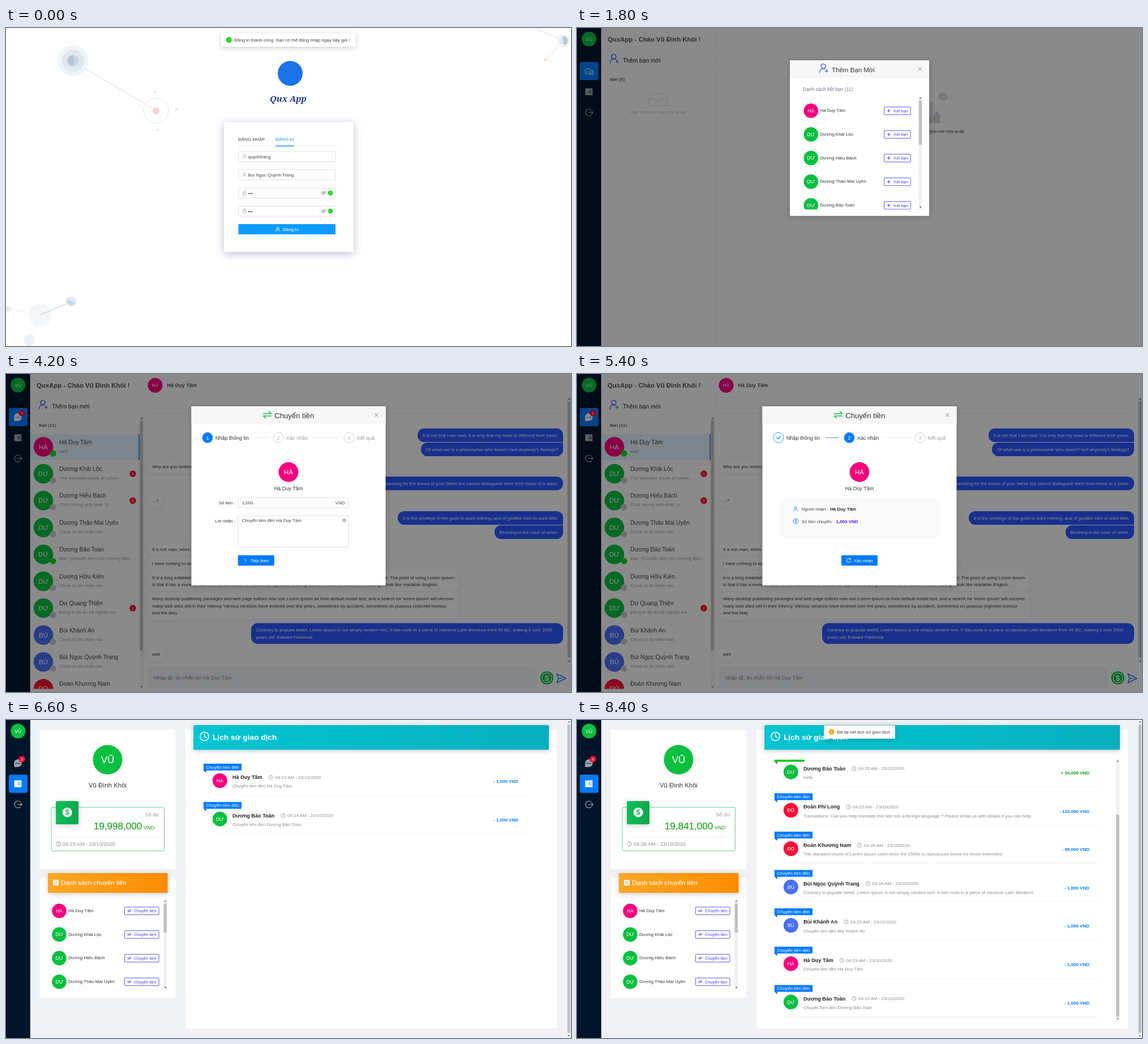
An HTML page for the animation above (9 s loop, 998 by 561 pixels).

```html
<!DOCTYPE html>
<html lang="vi">
<head>
<meta charset="utf-8">
<title>Chat app tour</title>
<style>
html,body{margin:0;width:100%;height:100%;overflow:hidden;background:#fff}
svg{display:block;width:100vw;height:100vh;font-family:"Liberation Sans",Arial,sans-serif}
text{white-space:pre}
.scene{display:none}
.scene.on{display:inline}
.soft{filter:drop-shadow(0 2px 3px rgba(60,70,110,.08))}
.drop{filter:drop-shadow(0 2px 5px rgba(0,0,0,.2))}
.glow{filter:drop-shadow(0 3px 8px rgba(90,60,170,.38))}
.word{font-family:"Noto Serif","Liberation Serif",serif;font-style:italic;font-weight:700}
</style>
</head>
<body>
<svg id="stage" viewBox="0 0 998 561" preserveAspectRatio="none"></svg>
<script>
const BLUE = '#007bff', GREEN = '#0bbf3f', LIME = '#05dc0c', RED = '#fa0f35', PINK = '#f5007f', VIOLET = '#4a6ff5', MONEY = '#0a9a0a';
const BOLD = 'font-weight="700"', MID = 'text-anchor="middle"', END = 'text-anchor="end"';

// Shape helpers
const text = (x, y, s, fill, t, a = '') => `<text x="${x}" y="${y}" font-size="${s}" fill="${fill}" ${a}>${t}</text>`;
const rect = (x, y, w, h, fill, rx = 0, a = '') => `<rect x="${x}" y="${y}" width="${w}" height="${h}" rx="${rx}" fill="${fill}" ${a}/>`;
const circ = (x, y, r, fill, a = '') => `<circle cx="${x}" cy="${y}" r="${r}" fill="${fill}" ${a}/>`;
const line = (x1, y1, x2, y2, c = '#ececf0', w = .7, a = '') => `<path d="M${x1} ${y1}L${x2} ${y2}" stroke="${c}" stroke-width="${w}" ${a}/>`;
const stroke = (d, c, w = 1, x = 0, y = 0, k = 1) =>
  `<path d="${d}" transform="translate(${x} ${y}) scale(${k})" fill="none" stroke="${c}" stroke-width="${w}" stroke-linecap="round" stroke-linejoin="round"/>`;
const clip = (id, body) => `<g clip-path="url(#${id})">${body}</g>`;
const ctx = document.createElement('canvas').getContext('2d');
const widthOf = (t, s, weight = 400) => {
  ctx.font = `${weight} ${s}px "Liberation Sans",Arial,sans-serif`;
  return ctx.measureText(t).width;
};

// Icons
const userIcon = (x, y, k, c, w = 1) => stroke('M-2.6-2.4a2.6 2.6 0 1 0 5.2 0a2.6 2.6 0 1 0-5.2 0M-4.4 5C-4-1 4-1 4.4 5', c, w, x, y, k);
const addIcon = (x, y) => userIcon(x - 1, y, 1.5, VIOLET, 1.1) + rect(x + 2, y + 2, 7, 7, '#fbfbfd') + stroke('M5 2.5v5M2.5 5h5', VIOLET, 1.3, x, y);
const check = (x, y, k, c = '#fff', w = 1.4) => stroke('M-3 0l2.2 2.2L3-2.4', c, w, x, y, k);
const cross = (x, y) => stroke('M-3-3L3 3M3-3L-3 3', '#777', .9, x, y);
const clock = (x, y, r, c, w = .8) => circ(x, y, r, 'none', `stroke="${c}" stroke-width="${w}"`) + stroke(`M0 ${-r * .6}V0l${r * .5} ${r * .3}`, c, w, x, y);
const swap = (x, y, k, c, w = 1) => stroke('M-7-2H7L3-6M7 2H-7l4 4', c, w, x, y, k);
const wallet = (x, y, c, hole) => rect(x - 6.5, y - 6, 13, 12, c, 1) + rect(x, y - 2, 6.5, 4, hole) + rect(x + 1, y - 1.2, 5.5, 2.4, c);
const bubbles = (x, y) => stroke('M-6 3a5 5 0 1 1 8 1l-3 0l-4 1zM3 5c3-1 4-5 2-7c3 1 3 5 1.500 6l1 2l-3-.5c-2 .6-3 0-4-.8', '#fff', 1, x, y) + [-4, -1.5, 1].map(d => circ(x + d, y, .6, '#fff')).join('');
const talk = (x, y, c, dot) => circ(x, y, 6.8, c) + `<path d="M${x - 6.5} ${y}v7h6z" fill="${c}"/>` + [-3, 0, 3].map(d => circ(x + d, y + .5, .9, dot)).join('');
const badge = (x, y, n, r = 5.8) => circ(x, y, r, RED) + text(x, y + 2.5, 7, '#fff', n, MID);
const coin = (x, y, r, c, sign) => circ(x, y, r, c) + text(x, y + r * .52, r * 1.5, sign, '$', MID + BOLD.padStart(20));
const coinLine = (x, y, c) => circ(x, y, 4.5, 'none', `stroke="${c}" stroke-width=".9"`) + text(x, y + 2.5, 7, c, '$', MID);
const scrollbar = (x, y0, y1, t0, t1, w = 6.5) => rect(x, y0, w, y1 - y0, '#f1f1f3') + rect(x + .6, t0, w - 1.2, t1 - t0, '#c1c1c3') +
  `<path d="M${x + 1.5} ${y0 + 4.5}h4l-2-2.500zM${x + 1.5} ${y1 - 5}h4l-2 2.500z" fill="#666"/>`;

// People
const me = ['Vũ Đình Khôi', GREEN];
const people = [
  ['Hà Duy Tâm', PINK], ['Dương Khải Lộc', GREEN], ['Dương Hiếu Bách', GREEN], ['Dương Thảo Mai Uyên', GREEN],
  ['Dương Bảo Toàn', GREEN], ['Dương Hữu Kiên', GREEN], ['Dư Quang Thiện', GREEN], ['Bùi Khánh An', VIOLET],
  ['Bùi Ngọc Quỳnh Trang', VIOLET], ['Đoàn Khương Nam', RED], ['Đoàn Phi Long', RED]
];
const [peer] = people;
const avatar = (x, y, r, [name, c]) => {
  const s = r > 20 ? 17.1 : r > 15 ? 11.4 : 8.6;
  return circ(x, y, r, c) + text(x, y + s * .36, s, '#fff', name.slice(0, 2).toUpperCase(), MID);
};

// Sign-in page
const deco = () =>
  line(125, 63, 258, 141, '#d3dae5', 1) + circ(118.5, 57.5, 27, '#eff4f8') + circ(118.5, 57.5, 19.5, '#dfe8ef') + circ(118.5, 57.5, 10, '#cbd6e1') +
  '<path d="M118.500 47.500a10 10 0 0 0 0 20l1-10z" fill="#b4c6d6"/>' + circ(265, 146, 22, 'none', 'stroke="#e2e8ed"') + circ(265, 146, 6, '#fbcdd7') +
  circ(263, 113, 2, '#fbd6dd') + circ(301, 143, 1.6, '#e2c0ce') + circ(268, 180, 1.2, '#ddd3dc') +
  line(945, 5, 975, 18, '#d8dde7', 1) + line(977, 31, 954, 54, '#d8dde7', 1) + circ(942, 3, 3.3, '#fff', 'stroke="#d8dde7"') +
  circ(984.5, 22.5, 10.5, '#fff', 'stroke="#d8dde7"') + circ(984.5, 22.5, 8, '#e2eaf1') + '<path d="M983 14.500a8 8 0 0 1 3 16z" fill="#b9cad9"/>' + circ(952.5, 56, 2.5, '#fbe2ac') +
  circ(60, 506.5, 20, '#f4f7f9') + line(60, 506.5, 108, 486, '#cfdbe6', 1.7) + circ(115, 482, 8.7, '#e4eaf0') + '<path d="M107 479l16 6a8.700 8.700 0 0 1-16-6z" fill="#c8d5e0"/>' +
  line(10, 497, 41, 503, '#e4dfe4', .8, 'stroke-dasharray="2 2"') + line(60, 507, 45, 543, '#d9dfe5', .8, 'stroke-dasharray="2 2"') + circ(5, 496, 5, '#e8ecf1') + circ(41.5, 551, 10, '#edf1f5');

const toast = (x, w, c, mark, t) => rect(x, 9.5, w, 23.5, '#fff', 2, 'class="drop"') + circ(x + 13.7, 21, 4.9, c) + mark(x + 13.7, 21) + text(x + 23, 24, 8, '#444', t);
const okMark = (x, y) => check(x, y, .6);
const warnMark = (x, y) => text(x, y + 2.5, 7, '#fff', '!', MID);

function field(y, value, secret, ok) {
  let s = rect(410.5, y, 171.5, 18, '#fff', 1, 'stroke="#d9d9dd" stroke-width=".8"');
  s += secret ? rect(418.5, y + 8, 5.5, 5, 'none', .5, 'stroke="#aaa" stroke-width=".8"') + stroke('M-1.700 0v-1.500a1.700 1.700 0 0 1 3.400 0V0', '#aaa', .8, 421.2, y + 8) : userIcon(421.2, y + 9, .72, '#aaa');
  s += text(427.5, y + 12, 8, '#444', value);
  if (secret) s += stroke('M-4 0Q0-5 4 0Q0 5-4 0M-3 3L3-3M-1 0a1 1 0 0 1 2 0', '#777', .8, 561, y + 9);
  if (ok) s += circ(573, y + 9, 4.3, LIME) + check(573, y + 9, .55);
  return s;
}

function signIn(register) {
  const bottom = register ? 395 : 331, by = bottom - 49;
  const tab = (x, w, t, on) => text(x, 198.5, 8, on ? '#1a86f0' : '#444', t) + (on ? rect(x, 207.5, w, 1.4, '#1a86f0') : '');
  return rect(0, 0, 998, 561, '#fff') + deco() + circ(502, 80, 22, '#1a73e8') + text(498.5, 130, 15, '#17357f', 'Qux App', MID + ' class="word"') +
    rect(385, 166, 228.5, bottom - 166, '#fff', 1, 'class="glow"') + line(410, 208.5, 588, 208.5, '#ebebef') +
    tab(410, 48, 'ĐĂNG NHẬP', !register) + tab(476, 33, 'ĐĂNG KÍ', register) + field(218, 'quynhtrang') +
    (register ? field(250, people[8][0]) + field(282, '•••', 1, 1) + field(314, '•••', 1, 1) : field(250, '•••', 1)) +
    rect(410.5, by, 171.5, 18, '#0d9bff', 1) + userIcon(480, by + 9, .75, '#fff', 1.2) + text(489, by + 12, 8, '#fff', register ? 'Đăng kí' : 'Đăng nhập') +
    (register ? toast(380, 237.5, LIME, okMark, 'Đăng kí thành công. Bạn có thể đăng nhập ngay bây giờ !') : '');
}

// App frame and friend list
function rail(active, n, dot) {
  const chat = active === 0;
  return rect(0, 0, 42.8, 561, '#001529') + avatar(21.3, 19.5, 13, me) + rect(5, chat ? 60 : 96.5, 33, 32, BLUE, 3) +
    (n ? talk(21, 76, chat ? '#fff' : '#9aa3ad', chat ? BLUE : '#001529') + badge(28, 69, n) : bubbles(21, 76)) +
    wallet(21, 112.5, chat ? '#a5adb5' : '#fff', chat ? '#001529' : BLUE) + (dot ? circ(28, 106, 3.5, RED) : '') +
    stroke('M4-4.500a6 6 0 1 0 0 9M-1 0h8M5-2l2 2l-2 2', '#a5adb5', 1.2, 21, 149);
}

function friends(rows) {
  let s = rect(42.8, 0, 201, 561, '#fbfbfd') + text(54, 24, 11.4, '#4a5058', `QuxApp - Chào ${me[0]} !`, BOLD) + line(43, 41, 243, 41) + addIcon(66, 54) +
    text(81, 61, 10.27, '#222', 'Thêm bạn mới') + line(43, 70.5, 243, 70.5) + line(43, 90, 54, 90) + line(92, 90, 236, 90) +
    text(58, 93, 8, '#222', `Bạn (${rows ? 11 : 0})`);
  if (!rows) return s + stroke('M-16 0l6-9H10l6 9v10q0 2-2 2h-28q-2 0-2-2zh9q1 5 4 5h6q3 0 4-5h9', '#d5d5d9', 1, 143, 125) + text(143, 151, 8, '#bcbcc0', 'Bạn chưa kết bạn với ai cả', MID) + line(243.5, 0, 243.5, 561, '#e4e4e8');
  const list = people.slice(0, 10).map((p, i) => {
    const y = 128.5 + 47.43 * i, { sub = 'Chưa có tin nhắn nào', n, on } = rows[i] || {};
    return (i || rows.idle ? '' : rect(43, 106, 193, 46, '#e2efff') + rect(234.3, 106, 1.7, 46, '#1a7cf0')) + avatar(66, y, 17.3, p) +
      circ(83, y + 11.7, 5.5, on ? LIME : '#c8c8cc') + text(94.3, y - 5, 10.27, '#444', p[0]) + text(94.3, y + 10, 8, '#999', sub) + (n ? badge(224, y + 47.4 - 47.4, n) : '');
  }).join('');
  return s + clip('friendClip', list) + scrollbar(236, 75, 556, 82, 488) + line(243.5, 0, 243.5, 561, '#e4e4e8');
}

// Conversation
const MINE = [
  ['It is not that I am mad, it is only that my head is different from yours.', 257, 108, 'b'],
  ["Of what use is a philosopher who doesn't hurt anybody's feelings?", 251, 133, 't'],
  ['I am searching for the bones of your father but cannot distinguish them from those of a slave.', 346, 193],
  ['It is the privilege of the gods to want nothing, and of godlike men to want little.', 292, 254, 'b'],
  ['Blushing is the color of virtue.', 121, 279, 't']
];
const THEIRS = [
  [['Why are you looking attentively at a pile of .'], 170, 163],
  [['.. ?'], 27, 223],
  [['If a rich man, when you will; if a poor man, when you can.'], 219, 309],
  [['I have nothing to ask but that you would remove to the other side, that you may not, by intercepting the sunshine ...'], 422, 334],
  [['It is a long established fact that a reader will be distracted by the readable content of a page when looking at its layout. The point of using Lorem Ipsum',
    "is that it has a more-or-less normal distribution of letters, as opposed to using 'Content here, content here', making it look like readable English."], 0, 359],
  [['Many desktop publishing packages and web page editors now use Lorem Ipsum as their default model text, and a search for \'lorem ipsum\' will uncover',
    'many web sites still in their infancy. Various versions have evolved over the years, sometimes by accident, sometimes on purpose (injected humour',
    'and the like).'], 0, 396.5]
];
const LONG = ['Contrary to popular belief, Lorem Ipsum is not simply random text. It has roots in a piece of classical Latin literature from 45 BC, making it over 2000',
  'years old. Edward Fairbrook'];
const INK = '#2a58ff';
const para = (x, y, c, lines) => lines.map((t, i) => text(x, y + 2.8 + 12.4 * i, 8, c, t)).join('');

function chat({ right = 992, scroll = 0, well, card }) {
  const wide = right === 992 ? 557 : 551;
  let s = line(248, 68.5, right, 68.5, '#e6e6ea') + rect(right / 2 + 85.5, 62, 78.5, 13.5, '#c3c5c9', 4) + text(right / 2 + 124.7, 71, 6.85, '#fff', '23-10-2020 04:03 AM', MID + ' ' + BOLD);
  for (const [t, w, y, sq] of MINE)
    s += rect(right - w, y - 12, w, 24, INK, 11.5) + (sq ? rect(right - 13, sq === 't' ? y - 12 : y, 13, 12, INK, 1.5) : '') + text(right - 8.3, y + 2.8, 8, '#fff', t, END);
  const rest = well ? [...THEIRS, [['well'], 30, 494.5]] : THEIRS;
  for (const [t, w, y] of rest) s += rect(250, y - 12, w || wide - 1, 24 + 12.4 * (t.length - 1), '#fdfdfe', 11, 'class="soft"') + para(258, y, '#333', t);
  s += rect(right - wide, 439.5, wide, 36.5, INK, 11.5) + para(right - wide + 8.7, 451.5, '#fff', LONG);
  if (card) s += rect(851, 507.5, 133, 49.5, '#05c457', 6, 'class="drop"') + coin(871, 525, 9, '#fff', '#05c457') +
    text(892, 526.5, 9.13, '#fff', 'Chuyển 1,000 VND', BOLD) + text(889, 542, 8, '#fff', 'Chuyển tiền');
  return rect(243.8, 0, 755, 561, '#fafafd') + clip('chatClip', `<g transform="translate(0 ${-scroll})">${s}</g>`) +
    avatar(263.5, 20, 13, peer) + text(284.5, 22.5, 9.13, '#4a5058', peer[0], BOLD) + line(244, 41, 998, 41) +
    (right < 992 ? scrollbar(991.3, 41, 511, scroll ? 97 : 49, scroll ? 503 : 500) : '') +
    rect(250, 517, 688, 38, '#f0f1f3', 4) + text(261, 538.7, 9.13, '#7b8088', `Nhập @, tin nhắn tới ${peer[0]}`) +
    circ(955.3, 536, 11.6, GREEN) + circ(955.3, 536, 8.6, 'none', 'stroke="#fff" stroke-width="1.200"') + text(955.3, 541, 13.5, '#fff', '$', MID + ' ' + BOLD) +
    stroke('M0 0L16 8L0 16L3 8zM3 8H9', '#1a86f0', 1.5, 973, 529);
}

const noChat = rect(243.8, 0, 755, 561, '#fafafd') + rect(602, 130, 28, 38, '#dcdde1', 2) + rect(608, 140, 16, 2, '#fff') + rect(608, 147, 16, 2, '#fff') +
  '<path d="M600 152h12l3 6h12l8-12l6 7v15h-41z" fill="#cfd1d6"/><ellipse cx="646.500" cy="121" rx="8.500" ry="7" fill="#d5d7dc"/>' + [-3, 0, 3].map(d => circ(646.5 + d, 121, .9, '#fff')).join('') +
  text(684, 185, 8, '#333', 'Hãy bắt đầu trò chuyện với một ai đó', END);

// Dialogs
const dialog = (x, w, h, body) => rect(0, 0, 998, 561, '#000', 0, 'opacity=".45"') + rect(x, 57, w, h, '#fff', 1, 'class="drop"') +
  rect(x, 57, w, 30, '#f7f7f8') + line(x, 87, x + w, 87) + cross(x + w - 16.3, 72.3) + body;

const outlined = (x, y, w, t, icon) => rect(x, y - 6.7, w, 13.6, '#fff', 1, 'stroke="#4b45e8" stroke-width=".9"') + icon + text(x + 16.5, y + 2.7, 7.43, '#4b45e8', t);

function addFriends(n) {
  const plus = y => stroke('M-2.500 0h5M0-2.500v5', '#4b45e8', 1.1, 550.7, y);
  const list = people.slice(0, 5).map((p, i) => {
    const y = 146 + 41.7 * i;
    return avatar(413.3, y, 12.8, p) + text(429.3, y + 2.2, 8, '#333', p[0]) + outlined(542.7, y, 46.5, 'Kết bạn', plus(y));
  }).join('');
  return dialog(376, 246, 274.5, addIcon(436, 71) + text(450, 77.7, 11.5, '#333', 'Thêm Bạn Mới') + text(399, 110.7, 8.55, '#727a86', `Danh sách kết bạn (${n})`) +
    (n ? clip('addClip', list) + scrollbar(603.3, 120, 320, 128, 206) : ''));
}

function steps(now) {
  return ['Nhập thông tin', 'Xác nhận', 'Kết quả'].map((t, i) => {
    const x = 356 + 125 * i, on = i === now, done = i < now;
    return circ(x, 112.3, 9, on ? BLUE : '#fff', `stroke="${on || done ? BLUE : '#c4c4c8'}" stroke-width=".8"`) +
      (done ? check(x, 112.3, 1.15, BLUE, 1) : text(x, 115.6, 9.13, on ? '#fff' : '#b0b0b4', i + 1, MID)) + text(x + 13.7, 115.5, 9.13, on || done ? '#333' : '#9a9a9e', t) +
      (i < 2 ? line(i ? 543 : 439, 112.3, i ? 588 : 463, 112.3, done ? BLUE : '#e6e6ea', .8) : '');
  }).join('');
}

const button = (x, y, w, t, icon) => rect(x, y, w, 18.3, BLUE, 1) + icon + text(x + 22, y + 12, 8, '#fff', t);
const reload = (x, y) => stroke('M3-2a3.600 3.600 0 1 0 .5 3M3.300-4v2.200h-2', '#fff', 1, x, y);
const receipt = (y, rows) => rect(359, y, 281, 21.7 * rows.length + 26, '#fafafb') + rows.map(([label, x, c, v, icon], i) => {
  const m = y + 19 + 21.7 * i;
  return icon(386.3, m) + text(396.5, m + 2.8, 8, '#444', label + ' :') + text(x, m + 2.8, 8, c, v, BOLD);
}).join('');
const ROWS = [
  ['Người nhận', 447, '#222', peer[0], (x, y) => userIcon(x, y, .8, BLUE)],
  ['Số tiền chuyển', 457.5, '#5a14f0', '1,000 VND', (x, y) => coinLine(x, y, BLUE)],
  ['Số dư còn lại', 451.5, MONEY, '19,998,000 VND', (x, y) => rect(x - 4.3, y - 4, 8.6, 8, 'none', 0, `stroke="${BLUE}" stroke-width=".9"`) + rect(x, y - 1.3, 4, 2.6, BLUE)]
];

function transfer(step, busy) {
  let s = swap(461.5, 72, 1, '#0dbb45', 1.6) + text(474.3, 78, 13.1, '#333', 'Chuyển tiền') + steps(step);
  if (step < 2) s += avatar(499, 173, 17.4, peer) + text(499, 204.6, 9.13, '#333', peer[0], MID);
  const chevron = (x, y) => stroke('M-1.500-3L1.500 0l-3 3', '#fff', 1, x, y);
  if (step === 0) {
    const box = 'stroke="#d9d9dd" stroke-width=".8"';
    s += text(405, 229.7, 8, '#333', 'Số tiền :', END) + rect(409.7, 218, 195.5, 18, '#fff', 1, box) + text(416.7, 229.8, 8, '#444', '1,000') + text(598.5, 229.8, 8, '#444', 'VND', END) +
      text(405, 262, 8, '#333', 'Lời nhắn :', END) + rect(409.7, 250, 195.5, 55.5, '#fff', 1, box) + text(416.7, 261.3, 8, '#444', `Chuyển tiền đến ${peer[0]}`) +
      circ(597.5, 258, 3.3, '#b5b5b8') + stroke('M-1-1L1 1M1-1L-1 1', '#fff', .6, 597.5, 258) + button(409.7, 319.7, 64, 'Tiếp theo', chevron(423, 328.8));
  } else if (step === 1) {
    s += receipt(219, ROWS.slice(0, 2)) + button(467, 319.7, 64, 'Xác nhận', busy ? reload(480, 328.8) : chevron(480, 328.8));
  } else {
    s += circ(499, 153.5, 20.8, '#07dc0c') + check(499, 153.5, 2.7, '#fff', 1.3) + text(499, 205, 13.7, '#333', 'Thành công', MID) +
      button(457, 225.8, 84, 'Giao dịch khác', reload(470, 235)) + receipt(259, ROWS);
  }
  return dialog(327.5, 343, 316, s);
}

// Wallet page
const HISTORY = [
  [4, '04:28', '33', 'Trả tiền ăn trưa', 1], [4, '04:26', '34', 'hello', 1],
  [10, '04:25', '123', 'Translations: Can you help translate this site into a foreign language ? Please email us with details if you can help.'],
  [9, '04:25', '99', 'The standard chunk of Lorem Ipsum used since the 1500s is reproduced below for those interested'],
  [8, '04:24', '1', 'Contrary to popular belief, Lorem Ipsum is not simply random text. It has roots in a piece of classical Latin literature'],
  [7, '04:23', '1'], [0, '04:23', '1'], [4, '04:14', '1']
];

function entry([who, time, sum, note, income], y) {
  const p = people[who], tag = income ? 'Nhận tiền từ' : 'Chuyển tiền đến', c = income ? '#05c80a' : BLUE, x = 400 + widthOf(p[0], 9.13, 700);
  return rect(348.8, y, widthOf(tag, 8) + 9, 12, c) + `<path d="M349 ${y + 12}h4.500v4z" fill="${income ? '#047d08' : '#0056b8'}"/>` + text(353.3, y + 8.8, 8, '#fff', tag) +
    avatar(377.8, y + 30, 13, p) + text(400, y + 27, 9.13, '#222', p[0], BOLD) + clock(x + 15, y + 24, 3.6, '#888', .7) + text(x + 22.7, y + 26.8, 8, '#8c8c90', `${time} AM - 23/10/2020`) +
    text(400, y + 42.3, 8, '#8c8c90', note || `Chuyển tiền đến ${p[0]}`) + text(905, y + 34.2, 8, income ? MONEY : BLUE, `${income ? '+' : '-'} ${sum},000 VND`, END + ' ' + BOLD) +
    line(365, y + 56, 925, y + 56, '#f1f1f4');
}

function walletPage({ n, sum, time, items, scroll = 0, done }) {
  const icon = y => swap(217.8, y, .42, '#4b45e8', 2);
  const list = people.slice(0, 4).map((p, i) => {
    const y = 336.7 + 41.7 * i;
    return avatar(94, y, 12.8, p) + text(110, y + 2.2, 8, '#333', p[0]) + outlined(209.5, y, 60.5, 'Chuyển tiền', icon(y));
  }).join('');
  return rect(42, 0, 956, 561, '#f0f2f5') + rail(1, n) + rect(60, 17, 239.5, 246, '#fff') + avatar(179.5, 70, 26, me) + text(179.5, 119, 11.4, '#333', me[0], MID) +
    rect(80, 154, 199.5, 77, '#fff', 3, 'stroke="#4fcb86" stroke-width=".9"') + rect(88, 143, 40, 41, 'url(#leaf)', 2, 'class="drop"') + coin(108.2, 163, 8.5, '#fff', '#0db653') +
    text(270.5, 170, 9.13, '#999', 'Số dư', END) + text(240.2, 193.3, 17.1, MONEY, sum, END) + text(243, 193.3, 9.13, MONEY, 'VND') + line(88, 206, 270, 206) +
    clock(92.5, 218.6, 3.8, '#888') + text(100, 222, 9.13, '#8c8c90', `${time} AM - 23/10/2020`) +
    rect(60, 278, 239.5, 212.5, '#fff') + rect(74, 270, 211.5, 35, 'url(#sun)', 1, 'class="drop"') + rect(83, 282, 10, 10, '#fff', 1) +
    [284.7, 287, 289.3].map(y => line(85, y, 91, y, '#fb9a1a', .8)).join('') + text(97, 291.2, 11.4, '#fff', 'Danh sách chuyển tiền') +
    clip('payClip', list) + scrollbar(278, 316, 476, 324, 375) +
    rect(317, 17, 656, 527.5, '#fff') + rect(331, 9, 628, 43.5, 'url(#sea)', 1, 'class="drop"') + clock(350.5, 29, 7.6, '#fff', 1.5) + text(365, 34.6, 13.7, '#fff', 'Lịch sử giao dịch', BOLD) +
    clip('logClip', items.map((e, i) => entry(e, 77 + 67.65 * i - scroll)).join('')) +
    (items.length > 6 ? scrollbar(951.7, 69, 531, scroll ? 167 : 78, scroll ? 523 : 434) : '') +
    scrollbar(991, 0, 561, 8, 552) + (done ? toast(436, 126, '#faad14', warnMark, 'Đã tải hết lịch sử giao dịch') : '');
}

// States
const pay = p => `Bạn: [Chuyển tiền] cho ${p}…`;
const idle = { idle: 1, 0: { on: 1 } };
const first = { 0: { sub: 'Bạn: Contrary to popular belief,…', on: 1 } };
const busy = {
  0: { sub: 'well', on: 1 }, 1: { sub: 'The standard chunk of Lorem…', n: 1 }, 2: { sub: 'Chúc mừng sinh nhật :))', n: 3 },
  4: { sub: pay('Dương Bảo'), on: 1 }, 6: { sub: 'Đăng kí đồ án tốt nghiệp kìa', n: 1 }
};
const paid = { ...busy, 0: { sub: 'Bạn: [Chuyển tiền] Chuyển 1000…', on: 1 } };
const later = { ...busy, 0: { sub: pay('Hà Duy Tâm'), on: 1 }, 4: { sub: '[Nhận tiền] Nhận 33000 VND', n: 2, on: 1 }, 7: { sub: pay('Bùi Khá') }, 8: { sub: pay('Bùi Ng') } };

const app = (rows, main, n, dot) => rail(0, n, dot) + friends(rows) + main;
const talking = app(busy, chat({ right: 984, well: 1 }), 3);
const sent = { right: 984, scroll: 56.6, well: 1, card: 1 };
const latest = { n: 4, sum: '19,841,000', time: '04:28', items: HISTORY };
const scenes = [
  signIn(true), signIn(false), app(null, noChat), app(null, noChat) + addFriends(11), app(idle, noChat) + addFriends(0),
  app(first, chat({})), talking, talking + transfer(0), talking + transfer(1), talking + transfer(1, true),
  app(paid, chat(sent), 3) + transfer(2), walletPage({ n: 3, sum: '19,998,000', time: '04:23', items: HISTORY.slice(6) }),
  app(later, chat(sent), 4, true), walletPage(latest), walletPage({ ...latest, scroll: 83, done: true })
];

const area = (id, ...r) => `<clipPath id="${id}">${rect(...r, '#000')}</clipPath>`;
const fade = (id, a, b) => `<linearGradient id="${id}"><stop stop-color="${a}"/><stop offset="1" stop-color="${b}"/></linearGradient>`;
const stage = document.getElementById('stage');
stage.innerHTML = '<defs>' + area('friendClip', 43, 106, 193, 449.5) + area('chatClip', 244, 41, 754, 470) + area('addClip', 376, 120, 246, 200) +
  area('payClip', 60, 316, 239, 159) + area('logClip', 317, 70, 650, 461) + fade('leaf', '#0fbf5a', '#0ba84b') + fade('sun', '#ffa726', '#fb8c00') + fade('sea', '#00c5d2', '#08afbf') +
  '</defs>' + scenes.map(s => `<g class="scene">${s}</g>`).join('');

const layers = [...stage.querySelectorAll('.scene')];
const start = performance.now();
let shown = -1;
function tick() {
  const now = Math.floor(Math.max(0, performance.now() - start) / 600) % layers.length;
  if (now !== shown) layers.forEach((g, i) => g.classList.toggle('on', i === now));
  shown = now;
  requestAnimationFrame(tick);
}
tick();
</script>
</body>
</html>
```
